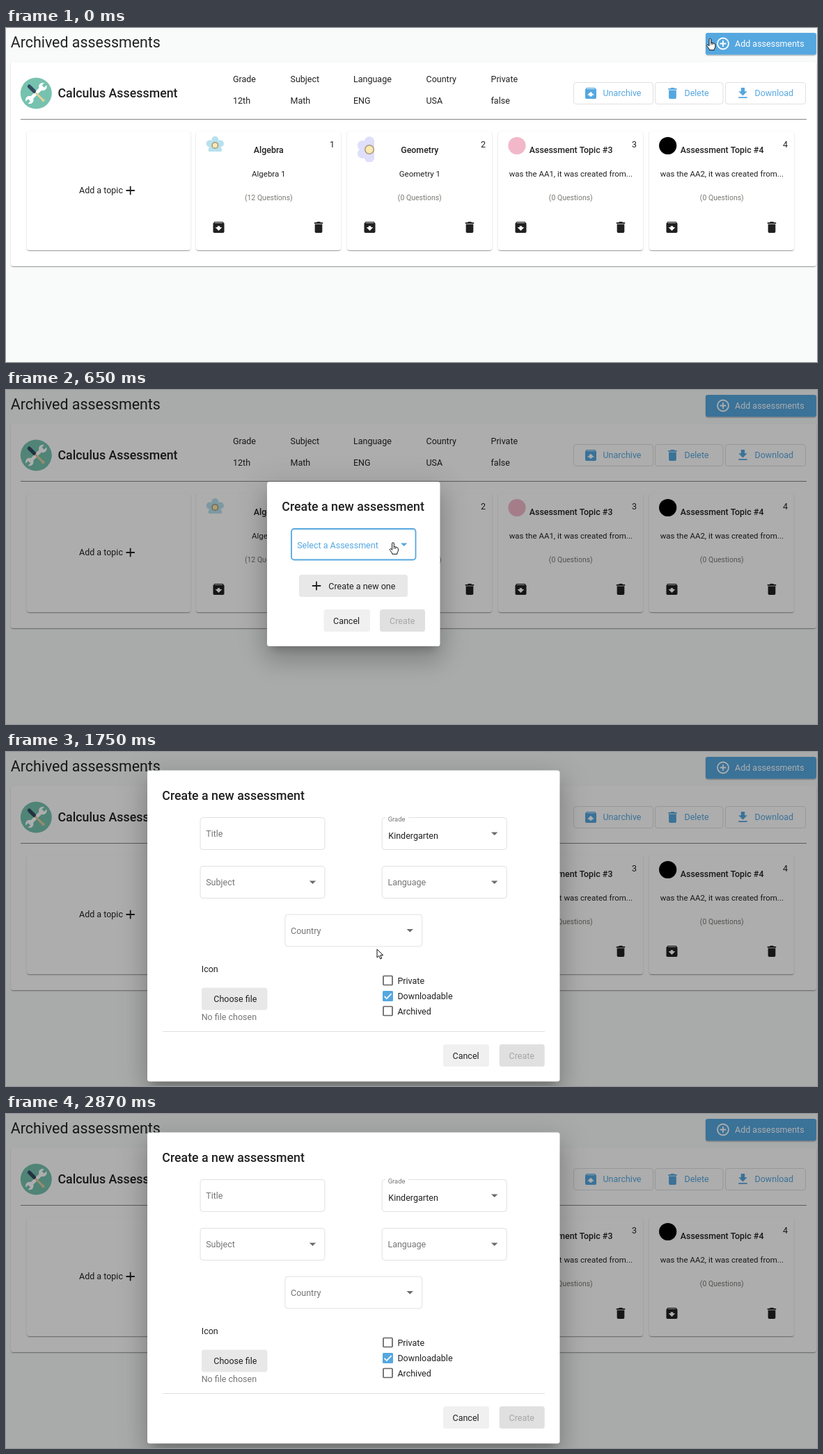
Recreate the animation shown at these times as an HTML page with a canvas. Size 1165 by 481 pixels, loop 2.93 s.

```html
<!DOCTYPE html>
<html lang="en">
<head>
<meta charset="utf-8">
<title>Archived assessments</title>
<style>
html, body { margin: 0; width: 100%; height: 100%; overflow: hidden; background: #f9fbfb; }
canvas { display: block; width: 1165px; height: 481px; }
</style>
</head>
<body>
<canvas id="stage" width="1165" height="481"></canvas>
<script>
const W = 1165, H = 481, LOOP = 2930, STEP = 65.1;
const INK = '#212121', GREY = '#757575', LINE = '#e0e0e0', BLUE = '#55a7e0';
const stage = document.getElementById('stage').getContext('2d');
const layer = Object.assign(document.createElement('canvas'), { width: W, height: H });
const layerCtx = layer.getContext('2d');
let g = stage;

// Icons on a 24 unit grid
const box = 'M5.3 3h13.4L21 5.8V19a2 2 0 0 1-2 2H5a2 2 0 0 1-2-2V5.8zM5.1 5h13.8l-.9-1H6z';
const icons = {
  archive: box + 'M12 17.5L6.5 12H10v-2h4v2h3.5z',
  unarchive: box + 'M12 9.5L17.5 15H14v2h-4v-2H6.5z',
  bin: 'M6 7h12v12a2 2 0 0 1-2 2H8a2 2 0 0 1-2-2zM5 4h3.5l1-1h5l1 1H19v2H5z',
  download: 'M9 3h6v6h4l-7 7-7-7h4zM5 18h14v2H5z',
  plus: 'M11 5h2v6h6v2h-6v6h-2v-6H5v-2h6z',
  addCircle: 'M11 7h2v4h4v2h-4v4h-2v-4H7v-2h4zM12 2a10 10 0 0 1 0 20a10 10 0 0 1 0-20zM12 4a8 8 0 0 0 0 16a8 8 0 0 0 0-16z'
};
for (const name in icons) icons[name] = new Path2D(icons[name]);
const arrow = new Path2D('M0 0v12l2.8-2.6 2 4.6 2-.9-2-4.4h3.9z');
const hand = new Path2D('M-1.4 1.2a1.4 1.4 0 0 1 2.8 0V6l1.2-.4 1 .9 1.3-.3.8 1 1.2.1.5 1.3v3.2l-1.5 3.2v1.3H-1.2v-1.2L-4.4 10.600a1.100 1.100 0 0 1 1.600-1.600l1.400 1.200z');

function text(str, x, y, { size = 12.5, color = INK, weight = 400, align = 'left' } = {}) {
  g.font = `${weight} ${size}px Roboto, "Open Sans", sans-serif`;
  g.fillStyle = color;
  g.textAlign = align;
  g.fillText(str, x, y);
}

function rect(x, y, w, h, r, fill, stroke, width = 1) {
  g.beginPath();
  g.roundRect(x, y, w, h, r);
  if (fill) { g.fillStyle = fill; g.fill(); }
  if (stroke) { g.strokeStyle = stroke; g.lineWidth = width; g.stroke(); }
}

function disc(x, y, r, color) {
  g.beginPath();
  g.arc(x, y, r, 0, 7);
  g.fillStyle = color;
  g.fill();
}

function segment(x1, y1, x2, y2, width, color, cap = 'round') {
  g.beginPath();
  g.moveTo(x1, y1);
  g.lineTo(x2, y2);
  g.lineWidth = width;
  g.lineCap = cap;
  g.strokeStyle = color;
  g.stroke();
}

function icon(name, x, y, color = INK, scale = 0.89) {
  g.save();
  g.translate(x, y);
  g.scale(scale, scale);
  g.translate(-12, -12);
  g.fillStyle = color;
  g.fill(icons[name], 'evenodd');
  g.restore();
}

// Box shadow with spread: the caster sits off stage, only its shadow lands
function shadow(x, y, w, h, dy, blur, spread, alpha) {
  const far = 3000;
  g.save();
  g.shadowColor = `rgba(0,0,0,${alpha})`;
  g.shadowBlur = blur;
  g.shadowOffsetX = far;
  g.shadowOffsetY = dy;
  rect(x - spread - far, y - spread, w + 2 * spread, h + 2 * spread, 3, '#000');
  g.restore();
}

function card(x, y, w, h) {
  shadow(x, y, w, h, 2, 1, -1, 0.2);
  shadow(x, y, w, h, 1, 1, 0, 0.14);
  shadow(x, y, w, h, 1, 3, 0, 0.12);
  rect(x, y, w, h, 3.5, '#fff');
}

function sheet(x, y, w, h) {
  shadow(x, y, w, h, 10, 13, -6, 0.2);
  shadow(x, y, w, h, 21, 34, 3, 0.14);
  shadow(x, y, w, h, 8, 41, 7, 0.12);
  rect(x, y, w, h, 3.5, '#fff');
}

function flower(x, y, petals, reach, size, heart, color, clip) {
  g.save();
  g.beginPath();
  g.rect(...clip);
  g.clip();
  for (let i = 0; i < petals; i++) {
    const a = -Math.PI / 2 + i * 2 * Math.PI / petals;
    disc(x + reach * Math.cos(a), y + reach * Math.sin(a), size, color);
  }
  disc(x, y, reach, color);
  disc(x, y, heart, '#a39a80');
  disc(x, y, heart - 1.5, '#ffe9ad');
  g.restore();
}

function tools(x, y) {
  disc(x, y, 22.5, '#76c2af');
  g.save();
  g.translate(x, y);
  g.rotate(Math.PI / 4);
  segment(0, -13, 0, 13, 5, '#fff');
  for (const s of [-1, 1]) {
    disc(0, s * 13.5, 5.8, '#fff');
    segment(0, s * 14, 0, s * 21, 4.4, '#76c2af', 'butt');
  }
  segment(0, 0, 14, 0, 3, '#e0cf9d');
  segment(13, 0, 16, 0, 4, '#e0cf9d', 'butt');
  segment(-14, 0, -4, 0, 5.2, '#324a5e');
  g.restore();
}

function topic(x, n, title, note, count) {
  const mid = x + 104.3;
  card(x, 149, 208, 171);
  text(n, x + 195.500, 171.5, { align: 'center' });
  const shift = n > 2 ? 0.3 : 0;
  text(title, mid + shift, 180, { size: 12.4, weight: 500, align: 'center' });
  text(note, mid, 213.5, { size: 11.5, align: 'center' });
  text(`(${count} Questions)`, mid, 248.4, { size: 10.5, color: '#787b74', align: 'center' });
  icon('archive', x + 32.5, 287);
  icon('bin', x + 176, 287);
}

function outlined(x, w, name, iconX, label, textX) {
  rect(x + 0.5, 78.5, w, 31, 3.5, '#fff', LINE);
  icon(name, iconX, 94, BLUE);
  text(label, textX, 98, { color: BLUE });
}

function page() {
  g.fillStyle = '#f9fbfb';
  g.fillRect(0, 0, W, H);
  text('Archived assessments', 6.7, 27.7, { size: 21.4 });
  card(1005, 7, 159, 31.5);
  rect(1005, 7, 159, 31.5, 3, BLUE);
  icon('addCircle', 1030, 22.5, '#fff');
  text('Add assessments', 1047, 27, { color: '#fff' });

  card(7, 49, 1157, 294);
  tools(43.3, 94);
  text('Calculus Assessment', 74.5, 100.3, { size: 17.8, weight: 500 });
  const facts = [[326, 'Grade', '12th'], [408.5, 'Subject', 'Math'], [499, 'Language', 'ENG'],
    [603.5, 'Country', 'USA'], [696.5, 'Private', 'false']];
  for (const [x, name, value] of facts) {
    text(name, x, 78);
    text(value, x, 109);
  }
  outlined(815, 114, 'unarchive', 840, 'Unarchive', 857.5);
  outlined(932, 97.5, 'bin', 957.5, 'Delete', 974.5);
  outlined(1033, 115, 'download', 1058.5, 'Download', 1075.5);
  g.fillStyle = '#858888';
  g.fillRect(21, 131, 1129, 1);

  card(30, 149, 235, 171);
  text('Add a topic', 105, 238.3);
  icon('plus', 178.7, 234);
  topic(273, 1, 'Algebra', 'Algebra 1', 12);
  topic(490, 2, 'Geometry', 'Geometry 1', 0);
  topic(707, 3, 'Assessment Topic #3', 'was the AA1, it was created from...', 0);
  topic(924, 4, 'Assessment Topic #4', 'was the AA2, it was created from...', 0);
  flower(300.3, 169, 5, 8, 5, 5, '#b7e1ed', [287, 156, 27, 22]);
  flower(522, 175, 6, 11.5, 7.2, 7, '#e0dffa', [504.5, 156, 24.500, 37]);
  disc(734, 169.5, 12.6, '#f2b8ca');
  disc(950.7, 169.5, 12.6, '#000');
}

function caret(x, y, color = '#6b6b6b') {
  g.beginPath();
  g.moveTo(x - 4.700, y - 2.3);
  g.lineTo(x + 4.700, y - 2.3);
  g.lineTo(x, y + 2.4);
  g.fillStyle = color;
  g.fill();
}

function button(x, y, w, label, textX, fill, color) {
  rect(x, y, w, 32, 3.5, fill);
  text(label, textX, y + 20.500, { color });
}

function startDialog(focused, raise) {
  const accent = focused ? BLUE : GREY;
  sheet(375, 132, 248.5, 237);
  text('Create a new assessment', 396.3, 174, { size: 17.8, weight: 500 });
  if (focused) rect(410, 200, 178.5, 44.5, 4, null, BLUE, 1.800);
  else rect(409.5, 199.5, 179, 45, 4, null, LINE);
  const size = 12.5 * (1 - 0.25 * raise);
  if (raise > 0.5) {
    g.fillStyle = '#fff';
    g.fillRect(415, 197, 9.4 * size + 6, 5);
  }
  text('Select a Assessment', 418.2, 227.5 - 25 * raise, { size, color: accent });
  caret(571.7, 222.7, focused ? BLUE : undefined);
  button(421, 266, 156, 'Create a new one', 463.3, '#e8e8e8');
  icon('plus', 446, 282);
  button(456.5, 316, 66.5, 'Cancel', 470, '#f0f0f0');
  button(537, 316, 65, 'Create', 551, LINE, '#a6a6a6');
}

function field(x, y, w, label, hasCaret) {
  rect(x + 0.5, y, w, 46, 4, null, LINE);
  if (label) text(label, x + 8.700, y + 27.5, { color: GREY });
  if (hasCaret) caret(x + w - 17, y + 23.2);
}

function checkbox(y, label, on) {
  if (on) {
    rect(541, y - 7.5, 15, 15, 1.5, BLUE);
    g.beginPath();
    g.moveTo(543.6, y + 0.4);
    g.lineTo(546.9, y + 3.6);
    g.lineTo(553.6, y - 3.3);
    g.strokeStyle = '#fff';
    g.lineWidth = 1.7;
    g.lineCap = 'butt';
    g.stroke();
  } else {
    rect(542, y - 6.5, 13, 13, 1, null, '#636363', 1.700);
  }
  text(label, 562.4, y + 4.5);
}

function formDialog() {
  sheet(203, 26.5, 592.5, 448);
  text('Create a new assessment', 224.3, 68.7, { size: 17.8, weight: 500 });
  field(278.5, 94.5, 179, 'Title');
  field(539.7, 94.5, 179, '', true);
  g.fillStyle = '#fff';
  g.fillRect(545, 93, 33, 4);
  text('Grade', 548.7, 100, { size: 9.4, color: GREY });
  text('Kindergarten', 549.3, 125);
  field(278.5, 164.5, 179, 'Subject', true);
  field(539.7, 164.5, 179, 'Language', true);
  field(400.3, 234, 197, 'Country', true);
  text('Icon', 280.8, 317);
  button(281, 339.5, 94.500, 'Choose file', 298.3, '#e8e8e8');
  text('No file chosen', 280.7, 385.700, { color: GREY });
  checkbox(329, 'Private');
  checkbox(351.5, 'Downloadable', true);
  checkbox(373, 'Archived');
  g.fillStyle = LINE;
  g.fillRect(225, 402, 549, 1);
  button(628, 421, 66, 'Cancel', 641.5, '#f0f0f0');
  button(708.7, 421, 65, 'Create', 722.5, LINE, '#a6a6a6');
}

const clamp = v => Math.min(1, Math.max(0, v));

function bezier(x1, y1, x2, y2) {
  const at = (a, b, s) => 3 * a * s * (1 - s) ** 2 + 3 * b * s * s * (1 - s) + s ** 3;
  return p => {
    let lo = 0, hi = 1;
    for (let i = 0; i < 20; i++) {
      const mid = (lo + hi) / 2;
      if (at(x1, x2, mid) < p) lo = mid; else hi = mid;
    }
    return at(y1, y2, hi);
  };
}
const decelerate = bezier(0, 0, 0.2, 1);
const swift = bezier(0.25, 0.8, 0.25, 1);
const ramp = (ease, t, start, length) => t <= start ? 0 : ease(clamp((t - start) / length));

const OPEN = 225, FORM = 1750, CLOSE = 1207;
const path = [[0, 1011.5, 15.5], [130, 1010, 17], [260, 1004, 24], [325, 843, 133], [390, 725, 184],
  [455, 645, 210], [520, 605, 216], [586, 593, 215], [651, 556, 220], [1105, 556, 220],
  [1367, 589, 257], [1625, 533, 284], [1955, 533, 284], [2280, 608, 366], [2540, 673, 431],
  [2605, 676, 434], [2670, 708, 452], [2735, 748, 465], [2800, 780, 474], [2850, 784, 490]];

function pointer(t) {
  const i = path.findIndex(p => p[0] > t);
  if (i < 0) return path[path.length - 1].slice(1);
  const [t0, x0, y0] = path[i - 1], [t1, x1, y1] = path[i];
  const k = (t - t0) / (t1 - t0);
  return [x0 + (x1 - x0) * k, y0 + (y1 - y0) * k];
}

function cursor(t) {
  const [x, y] = pointer(t);
  const over = (l, top, r, b) => x > l && x < r && y > top && y < b;
  const linked = t < OPEN ? over(1005, 7, 1164, 39)
    : t < FORM ? over(409, 199, 588, 245) || over(421, 266, 577, 298)
    : over(628, 421, 694, 453);
  g.save();
  g.translate(x, y);
  const shape = linked ? hand : arrow;
  g.fillStyle = '#fff';
  g.strokeStyle = '#111';
  g.lineWidth = 1;
  g.lineJoin = 'round';
  g.fill(shape);
  g.stroke(shape);
  if (linked) {
    for (const dx of [1.4, 3.7]) segment(dx, 6, dx, 8.6, 0.8, '#111');
  }
  g.restore();
}

function draw(t) {
  g = stage;
  page();
  const shown = ramp(decelerate, t, OPEN, 150);
  if (shown) {
    g.fillStyle = `rgba(0,0,0,${0.32 * ramp(swift, t, OPEN, 400)})`;
    g.fillRect(0, 0, W, H);
    g = layerCtx;
    g.clearRect(0, 0, W, H);
    if (t < FORM) {
      const raise = ramp(swift, t, 850, 400) * (1 - ramp(swift, t, CLOSE, 400));
      startDialog(t > OPEN + 155 && t < CLOSE, raise);
    } else {
      formDialog();
    }
    g = stage;
    const scale = 0.7 + 0.3 * shown, cx = 499.25, cy = 250.5;
    g.save();
    g.globalAlpha = shown;
    g.translate(cx, cy);
    g.scale(scale, scale);
    g.drawImage(layer, -cx, -cy);
    g.restore();
  }
  cursor(t);
}

const began = performance.now();
function tick() {
  const t = (performance.now() - began) % LOOP;
  draw(Math.min(44, Math.floor((t + 11) / STEP)) * STEP);
  requestAnimationFrame(tick);
}
tick();
</script>
</body>
</html>
```
